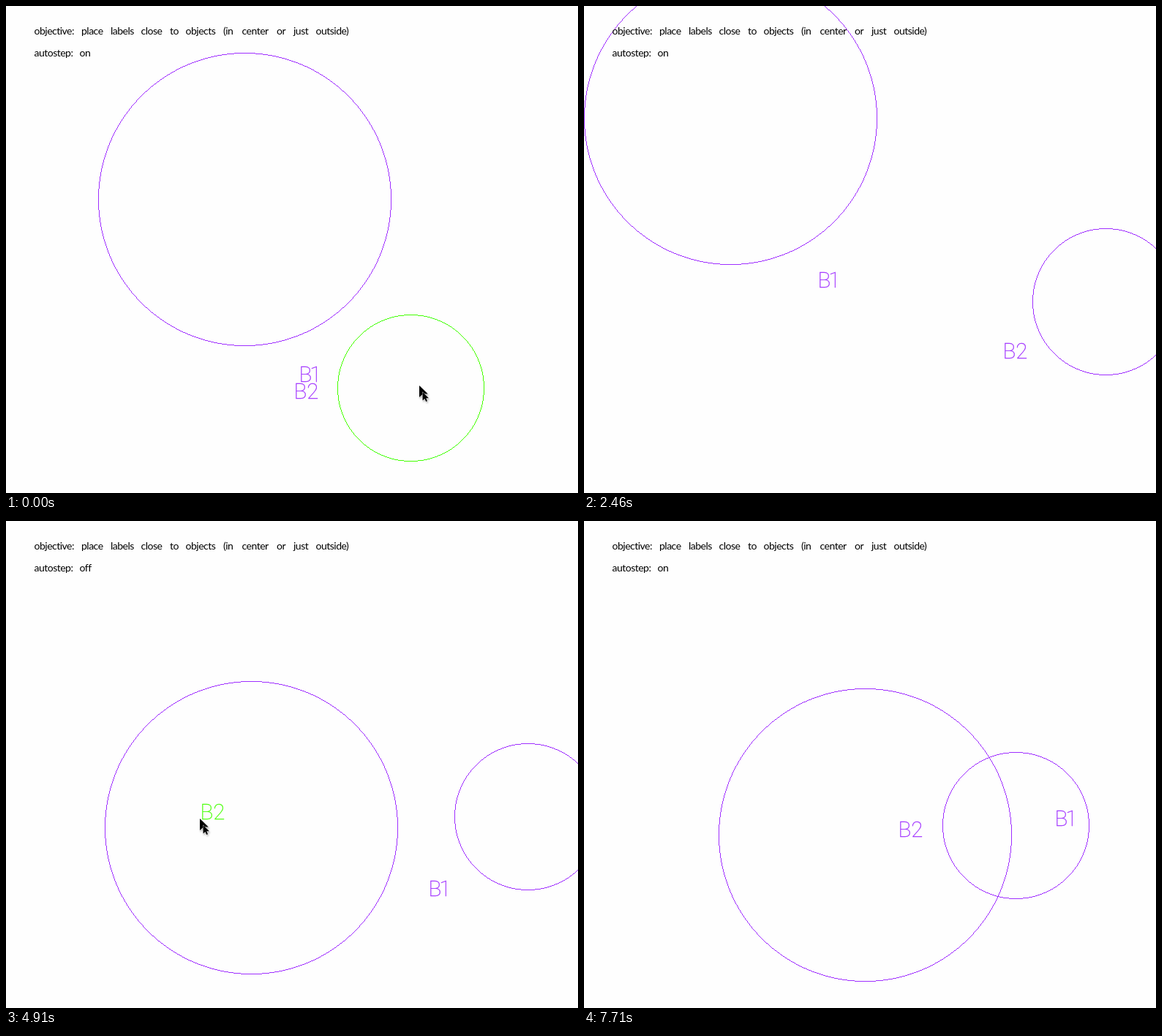
An HTML page for the animation above (8 s loop, 782 by 666 pixels).

```html
<!DOCTYPE html>
<html lang="en">
<head>
<meta charset="utf-8">
<title>Label placement</title>
<style>
  html, body { margin: 0; width: 100%; height: 100%; overflow: hidden; background: #fefefe; }
  svg { display: block; width: 782px; height: 666px; }
  .ring { fill: #9f2fff; shape-rendering: crispEdges; }
  .label { font: 100 29.5px Roboto, Inter, sans-serif; fill: #9f2fff; stroke: #9f2fff; stroke-width: .3; }
  .held { fill: #44ff00; }
  .label.held { stroke: #44ff00; }
  .info { font: 400 14px Lato, Inter, sans-serif; letter-spacing: -.5px; fill: #000; }
  #cursor { fill: #000; stroke: #fff; paint-order: stroke; filter: drop-shadow(1px 2px 1px #0004); }
</style>
</head>
<body>
<svg viewBox="0 0 782 666">
  <defs><path id="arrow" d="M0 0V16L4 12.5L6.5 18L9 17L6.6 11.6H11.8Z"/></defs>
  <path id="big" class="ring"/>
  <path id="small" class="ring"/>
  <text id="b1" class="label" dx="-2.5 -3">B1</text>
  <text id="b2" class="label" dx="-2.5">B2</text>
  <text class="info" y="39"><tspan x="38.5">objective:</tspan> <tspan x="103">place</tspan> <tspan x="143">labels</tspan> <tspan x="184.5">close</tspan> <tspan x="224">to</tspan> <tspan x="245.5">objects</tspan> <tspan x="297">(in</tspan> <tspan x="322.5">center</tspan> <tspan x="370">or</tspan> <tspan x="393">just</tspan> <tspan x="423.5">outside)</tspan></text>
  <text class="info" y="69"><tspan x="38.5">autostep:</tspan> <tspan x="100.5" id="mode">on</tspan></text>
  <g id="cursor">
    <use href="#arrow"/>
    <use href="#arrow" transform="translate(4.5 9) scale(.72)"/>
  </g>
</svg>
<script>
const LOOP = 8000, STEP = 60, PHASE = 30, SETTLE = 7710;
const $ = id => document.getElementById(id);

// Pointer waypoints: time, x, y. Everything dragged follows from these.
const pointer = [
  [0, 565, 519], [540, 725, 401], [870, 418, 375],
  [1060, 340, 330], [1360, 398, 440], [1630, 311, 390], [1980, 214, 219], [2150, 214, 219],
  [2430, 800, 522], [2900, 690, 430],
  [3120, 300, 245], [3640, 419, 524], [3810, 472, 479],
  [4000, 572, 481], [4870, 265, 407], [4970, 265, 407], [5230, 306, 443],
  [5960, 561, 524], [6390, 714, 376], [6590, 714, 376], [7050, 705, 422]
];

// Where each label sits relative to its circle
const b1Offset = [
  [1060, 77, 250], [1360, 175, 200], [1630, 175, 200],
  [1980, 122, 232], [3120, 122, 232], [3640, 245, 94]
];
const b2Offset = [[0, -157, 15], [540, -138, 78]];

const drags = {
  big: [[1060, 2150], [3120, 3690]],
  small: [[0, 540]],
  b1: [[5960, 7050]],
  b2: [[4000, 5230]]
};
const settled = { big: [384, 429], small: [590, 416], b1: [646, 417], b2: [432, 432] };

const add = (a, b, k = 1) => [a[0] + b[0] * k, a[1] + b[1] * k];
const within = (t, from, to) => t >= from && t < to;

function along(path, t) {
  const next = path.findIndex(p => p[0] > t);
  if (next < 1) return path.at(next).slice(1);
  const [t0, ...a] = path[next - 1], [t1, ...b] = path[next];
  const f = (t - t0) / (t1 - t0);
  return a.map((v, i) => v + (b[i] - v) * f);
}

// Adds the pointer's travel during every drag of the part
function dragged(id, home, t) {
  return drags[id].reduce((pos, [from, to]) => {
    if (t < from) return pos;
    const moved = add(pos, along(pointer, Math.min(t, to)));
    return add(moved, along(pointer, from), -1);
  }, home);
}

function layout(t) {
  if (t >= SETTLE) return settled;
  const big = dragged("big", [326, 264], t);
  const small = dragged("small", [553, 522], t);
  return {
    big, small,
    b1: dragged("b1", add(big, along(b1Offset, t)), t),
    b2: dragged("b2", add(small, along(b2Offset, t)), t)
  };
}

// A circle one pixel wide without smoothing
function ring(r) {
  let d = "";
  for (let i = 0; i <= r * Math.SQRT1_2; i++) {
    const j = Math.round(Math.sqrt(r * r - i * i));
    for (const x of [i, -i])
      for (const y of [j, -j]) d += `M${x} ${y}h1v1h-1zM${y} ${x}h1v1h-1z`;
  }
  return d;
}

const move = (id, [x, y]) =>
  $(id).setAttribute("transform", `translate(${Math.round(x)} ${Math.round(y)})`);

function draw(time) {
  const t = Math.max(0, PHASE + Math.floor((time - PHASE) / STEP) * STEP);
  const parts = layout(t);
  for (const id in parts) {
    move(id, parts[id]);
    $(id).classList.toggle("held", drags[id].some(span => within(t, ...span)));
  }
  move("cursor", along(pointer, t));
  $("cursor").style.visibility = t < SETTLE && !within(t, 2430, 2940) ? "visible" : "hidden";
  $("mode").textContent = within(t, 3950, SETTLE) ? "off" : "on";
}

$("big").setAttribute("d", ring(200));
$("small").setAttribute("d", ring(100));

const origin = performance.now();
function tick() {
  draw((performance.now() - origin) % LOOP);
  requestAnimationFrame(tick);
}
tick();
</script>
</body>
</html>
```
